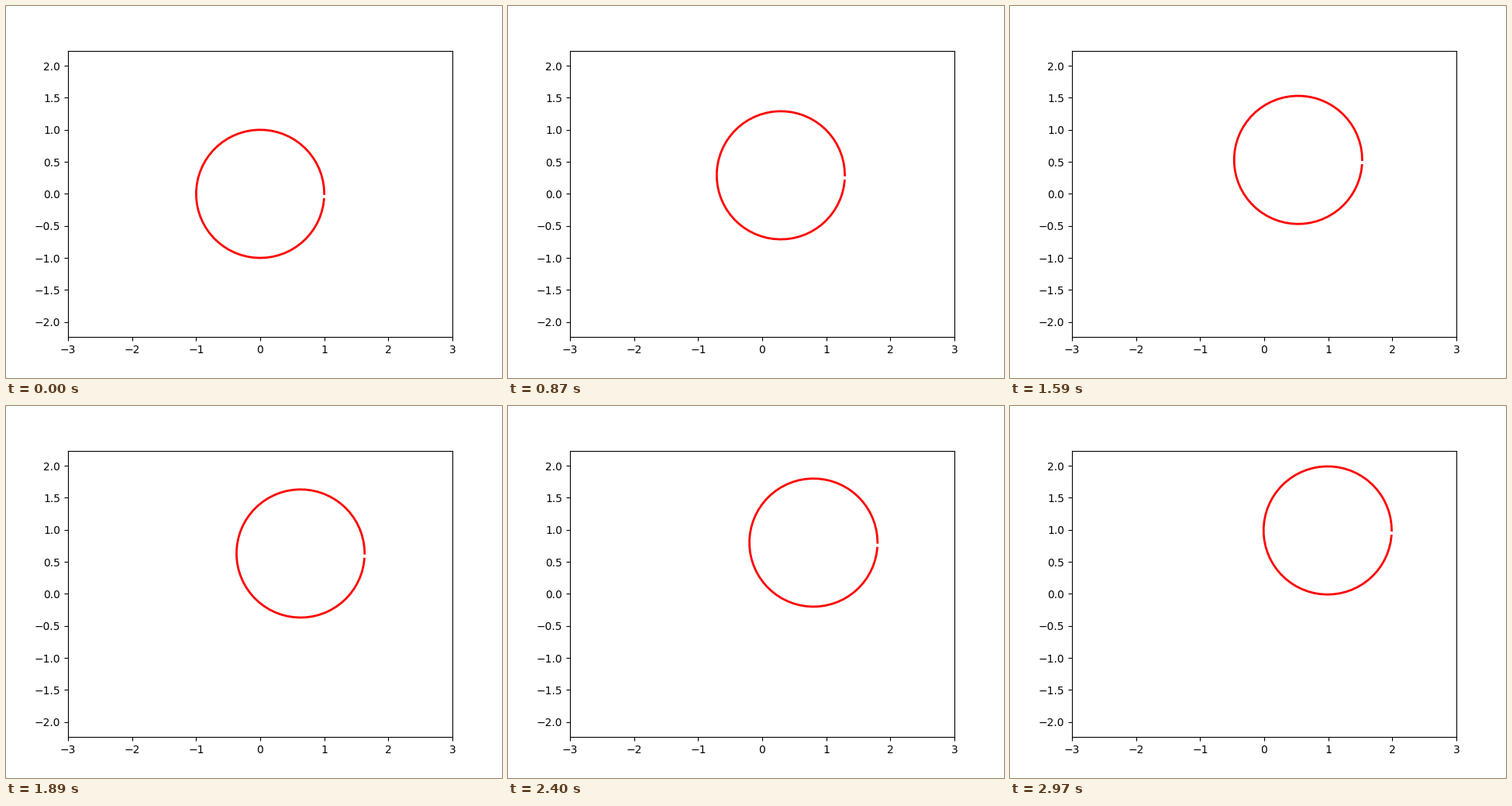
A matplotlib script for the animation above (3 s loop, 640 by 480 pixels).

```python
import matplotlib.pyplot as plt
import numpy as np
from matplotlib.animation import FuncAnimation

FRAMES = 100
INTERVAL = 30  # ms
STEP = 0.01    # shift of the centre per frame

theta = np.arange(0, 2 * np.pi, 0.1)
x, y = np.cos(theta), np.sin(theta)

fig, ax = plt.subplots(figsize=(6.4, 4.8), dpi=100)

# Equal scale on both axes
box = ax.get_position()
half = 3 * (box.height * 4.8) / (box.width * 6.4)
ax.set_xlim(-3, 3)
ax.set_ylim(-half, half)

line, = ax.plot([], [], color="red", lw=2)


def update(i):
    line.set_data(x + STEP * i, y + STEP * i)
    return line,


anim = FuncAnimation(fig, update, frames=FRAMES, interval=INTERVAL,
                     repeat=True, repeat_delay=0)
plt.show()
```
